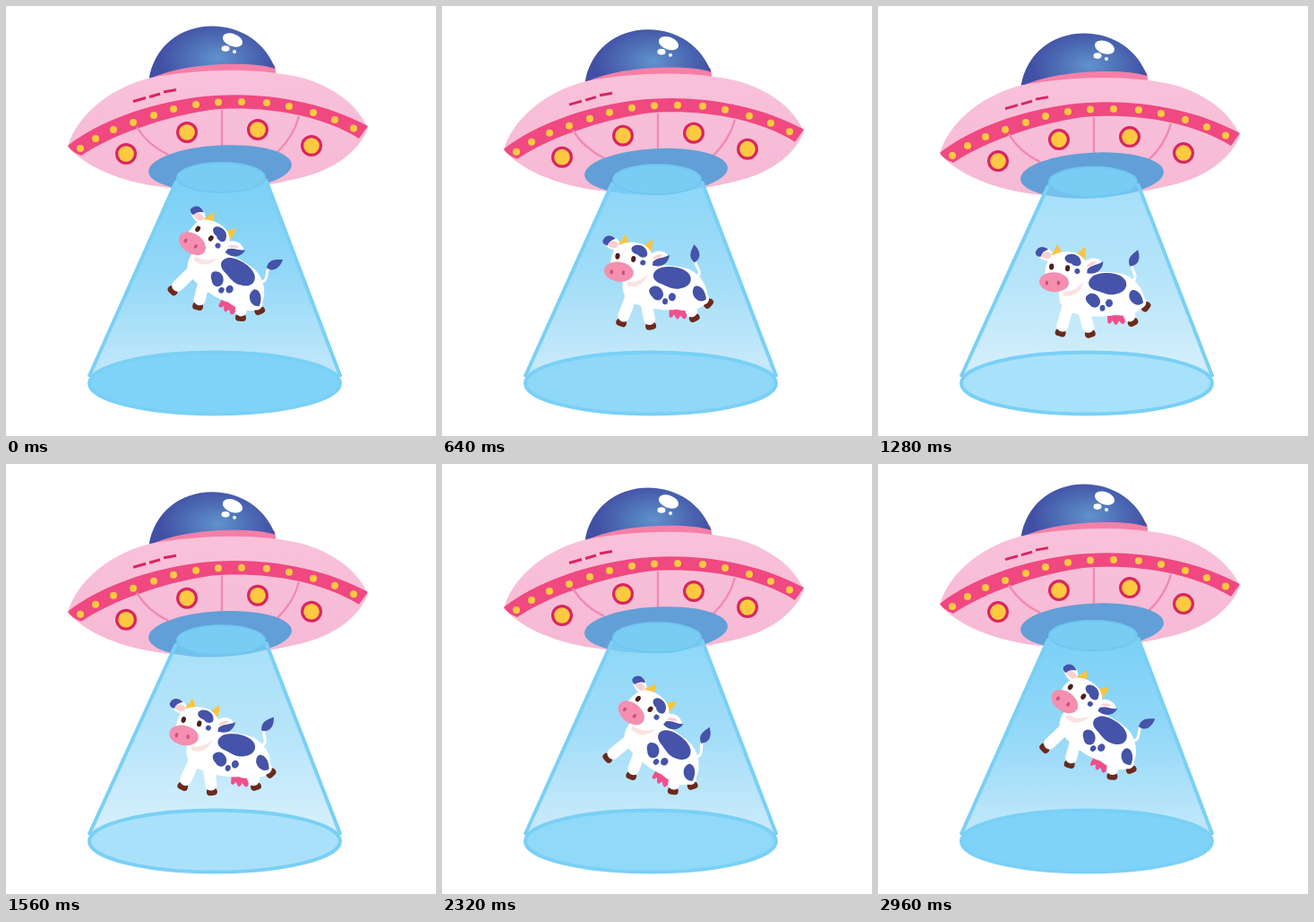
These frames come from a looping animation (480 by 480 pixels, 3 s). An HTML page:

```html
<!DOCTYPE html>
<html lang="en">
<head>
<meta charset="utf-8">
<title>Cow in a beam</title>
<style>
  html, body { margin: 0; height: 100%; overflow: hidden; background: #fff; }
  svg { display: block; width: 100vw; height: 100vh; }
  .blue { fill: #4553a8; }
  .horn { fill: #fac53d; }
  .leg, .hoof { fill: none; stroke: #fff; stroke-width: 13; stroke-linecap: round; }
  .hoof { stroke: #6b2a1d; stroke-width: 8; }
  .rim { fill: none; stroke: #79d0f6; stroke-width: 4; stroke-linejoin: round; }
  .seam { fill: none; stroke: #f188b0; stroke-width: 2.3; }
</style>
</head>
<body>
<svg viewBox="0 0 480 480">
  <defs>
    <radialGradient id="glass" gradientUnits="userSpaceOnUse" cx="236" cy="58" r="66" gradientTransform="matrix(1 0 0 .62 0 22)">
      <stop offset="0" stop-color="#6093cb"/>
      <stop offset=".5" stop-color="#4f70b7"/>
      <stop offset="1" stop-color="#414fa4"/>
    </radialGradient>
    <linearGradient id="light" gradientUnits="userSpaceOnUse" x1="0" y1="205" x2="0" y2="395">
      <stop offset="0" stop-color="#7dd1f7"/>
      <stop offset=".5" stop-color="#93d8f8"/>
      <stop offset="1" stop-color="#bce6fa"/>
    </linearGradient>
    <linearGradient id="hull" gradientUnits="userSpaceOnUse" x1="0" y1="72" x2="0" y2="207">
      <stop offset="0" stop-color="#f9c1da"/>
      <stop offset="1" stop-color="#f6b9d5"/>
    </linearGradient>
  </defs>

  <g id="ufo">
    <path fill="#f67fa7" d="M159 90 L162 75 C185 62 270 56 300 66 L302 80 Z"/>
    <path fill="url(#glass)" d="M159.500 82 C165 46 194 22.500 230 22.500 C264 22.500 290 42 300.500 70 C275 61 195 63 159.500 82 Z"/>
    <g fill="#fff">
      <ellipse cx="253" cy="38" rx="11.500" ry="7" transform="rotate(20 253 38)"/>
      <ellipse cx="245" cy="47.500" rx="4.500" ry="3.300"/>
      <circle cx="255" cy="51" r="2"/>
    </g>
    <path fill="url(#hull)" d="M69 157 C79 120 121 89 162 80 C205 72 260 69 302 75 C350 80 388 102 404 136 C394 164 362 186 319 194 C270 206 205 208 160 200 C122 193 87 178 69 157 Z"/>
    <path fill="#f04880" d="M69 156 C104 128 160 109 212 102 C275 94 346 103 404 134 L394 148 C348 119 280 111 228 116 C175 124 118 144 84 167 Q73 163 69 156 Z"/>
    <path class="seam" d="M146 135 Q158 155 181 166 M241 116 V156 M327 123 Q321 146 302 164"/>
    <path fill="none" stroke="#d8265f" stroke-width="3" d="M142 106.500 L156 102.500 M160 101.500 L172 98 M176 96 L190 93.500"/>
    <g id="lamps"></g>
    <ellipse cx="239" cy="181" rx="80" ry="25.500" fill="#629fd7" transform="rotate(-3 239 181)"/>
  </g>

  <g id="glow">
    <path id="cone" fill="url(#light)"/>
    <ellipse cx="233" cy="421" rx="140" ry="34.500" fill="#fff"/>
    <ellipse cx="233" cy="421" rx="140" ry="34.500" fill="#7fd3f8"/>
  </g>
  <ellipse id="mouth" cx="240" rx="49" ry="16.500" fill="#79cdf4" stroke="#70c7f0" stroke-width="2"/>
  <path id="sides" class="rim"/>
  <ellipse class="rim" cx="233" cy="421" rx="140" ry="34.500"/>

  <g id="cow">
    <g id="tail">
      <path fill="none" stroke="#fff" stroke-width="3" stroke-linecap="round" d="M283 303 C291 295 277 291 279 281"/>
      <path id="tuft" class="blue" d="M279 287 C270 281 274 274 276 267 C282 271 288 280 279 287 Z"/>
    </g>
    <path fill="#f0508c" d="M257 337 L259 351 Q262 354 264 348 L267 352 Q270 354 271 348 L275 351 Q279 352 278 345 L280 335 Z"/>
    <g id="legs"></g>
    <path fill="#fff" d="M204 308 C220 297 250 293 270 295 C286 298 297 311 299 326 C296 338 280 343 266 342 C252 346 235 346 220 343 C204 340 199 326 204 308 Z"/>
    <path fill="#fbe3e1" d="M207 319 Q222 317 229 307 Q224 327 207 324 Z"/>
    <path class="blue" d="M237 302 C243 295 264 293 273 300 C280 306 277 315 267 318 C258 322 250 317 243 316 C235 314 232 308 237 302 Z"/>
    <path class="blue" d="M234 322 C240 316 249 322 249 329 C248 336 241 337 237 332 C233 329 231 325 234 322 Z"/>
    <ellipse class="blue" cx="252" cy="335" rx="3" ry="3.500"/>
    <ellipse class="blue" cx="259" cy="329" rx="4" ry="4.500"/>
    <path class="blue" d="M283 313 C288 311 295 316 297 326 C291 332 283 327 281 321 Q280 315 283 313 Z"/>

    <g transform="translate(-2 3)">
      <path fill="#fff" d="M195 284 C183 285 175 280 176 273 C182 266 193 269 196 279 Z"/>
      <path fill="#f9cfd2" d="M193 281 Q183 283 181 278 Q187 271 193 276 Z"/>
      <path class="blue" d="M175 276 C176 268 184 267 189 271 Q182 274 181 280 Q176 280 175 276 Z"/>
      <path fill="#fff" d="M228 286 C233 276 244 275 250 281 C248 292 238 296 229 294 Z"/>
      <path class="blue" d="M232 294 C236 284 244 286 251 280 C252 290 243 297 232 294 Z"/>
      <path fill="#f9cfd2" d="M232 288 Q237 280 244 281 Q240 286 232 288 Z"/>
      <path class="horn" d="M193 277 L199 264 L205 275 Z M220 275 L230 265 L231 279 Z"/>
      <path fill="#fff" d="M188 289 C190 276 202 272 213 272 C227 272 235 282 234 294 C232 307 222 317 207 317 C191 317 185 302 188 289 Z"/>
      <path class="blue" d="M209 277 C214 272 224 274 226 281 C229 288 219 289 216 285 C211 285 206 281 209 277 Z"/>
      <circle class="blue" cx="223" cy="293" r="3"/>
      <ellipse cx="198" cy="307" rx="16.500" ry="11" fill="#f48fb0"/>
      <g fill="#cf527c">
        <ellipse cx="190" cy="308.500" rx="1.800" ry="2.600"/>
        <ellipse cx="203" cy="307.500" rx="1.800" ry="2.600"/>
      </g>
      <g fill="#4b201d">
        <ellipse cx="194" cy="290" rx="2.600" ry="3.500"/>
        <ellipse cx="212" cy="290.500" rx="2.600" ry="3.500"/>
      </g>
    </g>
  </g>
</svg>
<script>
const LOOP = 3000;
const $ = id => document.getElementById(id);
const set = (id, name, value) => $(id).setAttribute(name, value);
const disc = (x, y, r, color) => `<circle cx="${x}" cy="${y}" r="${r}" fill="${color}"/>`;

const bulbs = [[83, 159], [100, 148], [120, 138], [142, 130], [165, 122], [187, 115], [212, 110],
  [237, 107.5], [263, 107], [291, 108], [316, 112], [343, 119], [367, 127], [388, 136.5]];
const lamps = [[134, 165], [202, 141], [281, 138], [341, 156]];
$('lamps').innerHTML =
  bulbs.map(([x, y]) => disc(x, y, 4, '#fcc940')).join('') +
  lamps.map(([x, y]) => disc(x, y, 12, '#d8265f') + disc(x, y, 8.8, '#fcc940')).join('');

// Each leg runs from hip to hoof
const legs = [[277, 332, 285, 345], [286, 321, 297, 328], [214, 333, 208, 362], [229, 333, 239, 361]];
$('legs').innerHTML = legs.map(([x1, y1, x2, y2]) => {
  const len = Math.hypot(x2 - x1, y2 - y1), dx = (x2 - x1) / len, dy = (y2 - y1) / len;
  const x = x2 + dx * 4, y = y2 + dy * 4;
  return `<path class="hoof" d="M${x + dy * 2} ${y - dx * 2} L${x - dy * 2} ${y + dx * 2}"/>` +
    `<path class="leg" d="M${x1} ${y1} L${x2 - dx * 4} ${y2 - dy * 4}"/>`;
}).join('');

// Cow pose: time, x, y, angle
const poses = [
  [0, 248.5, 307, 34], [320, 250.5, 313, 20.5], [1000, 253, 321, 0],
  [1560, 251.5, 327, 12.5], [1880, 250.5, 328, 22], [2320, 248, 323, 39]
];

function poseAt(i) {
  const n = poses.length, turn = Math.floor(i / n);
  const [time, ...rest] = poses[i - turn * n];
  return [time + turn * LOOP, ...rest];
}

// Smooth periodic curve through the poses
function cowPose(t) {
  let i = poses.length - 1;
  while (poses[i][0] > t) i--;
  const [a, b, c, d] = [-1, 0, 1, 2].map(k => poseAt(i + k));
  const h = c[0] - b[0], s = (t - b[0]) / h;
  return [1, 2, 3].map(k => {
    const m0 = (c[k] - a[k]) / (c[0] - a[0]) * h;
    const m1 = (d[k] - b[k]) / (d[0] - b[0]) * h;
    const diff = c[k] - b[k];
    return b[k] + s * (m0 + s * (3 * diff - 2 * m0 - m1 + s * (m0 + m1 - 2 * diff)));
  });
}

function draw(t) {
  const phase = 2 * Math.PI * t / LOOP;
  const wave = (1 - Math.cos(phase)) / 2;
  const ramp = 1 - Math.abs(1 - 2 * t / LOOP);
  const drop = 4.5 * (wave + ramp);
  const top = 191.5 + drop * .6;

  set('ufo', 'transform', `translate(0 ${drop})`);
  set('mouth', 'cy', top);
  set('glow', 'opacity', 1 - .34 * wave);
  set('cone', 'd', `M191 ${top} A49 16.500 0 0 0 289 ${top} L374 414 L92 414 Z`);
  set('sides', 'd', `M190 ${top + 4} L92.500 414 M290 ${top + 2} L373.500 414`);

  const [x, y, angle] = cowPose(t);
  const wag = Math.cos(2 * phase);
  set('cow', 'transform', `translate(${x} ${y}) rotate(${angle}) translate(-253 -322)`);
  set('tail', 'transform', `rotate(${2 + 6 * wag} 283 303)`);
  set('tuft', 'transform', `rotate(${15 + 15 * wag} 279 284)`);
}

const start = performance.now();
function tick() {
  draw((performance.now() - start) % LOOP);
  requestAnimationFrame(tick);
}
tick();
</script>
</body>
</html>
```
